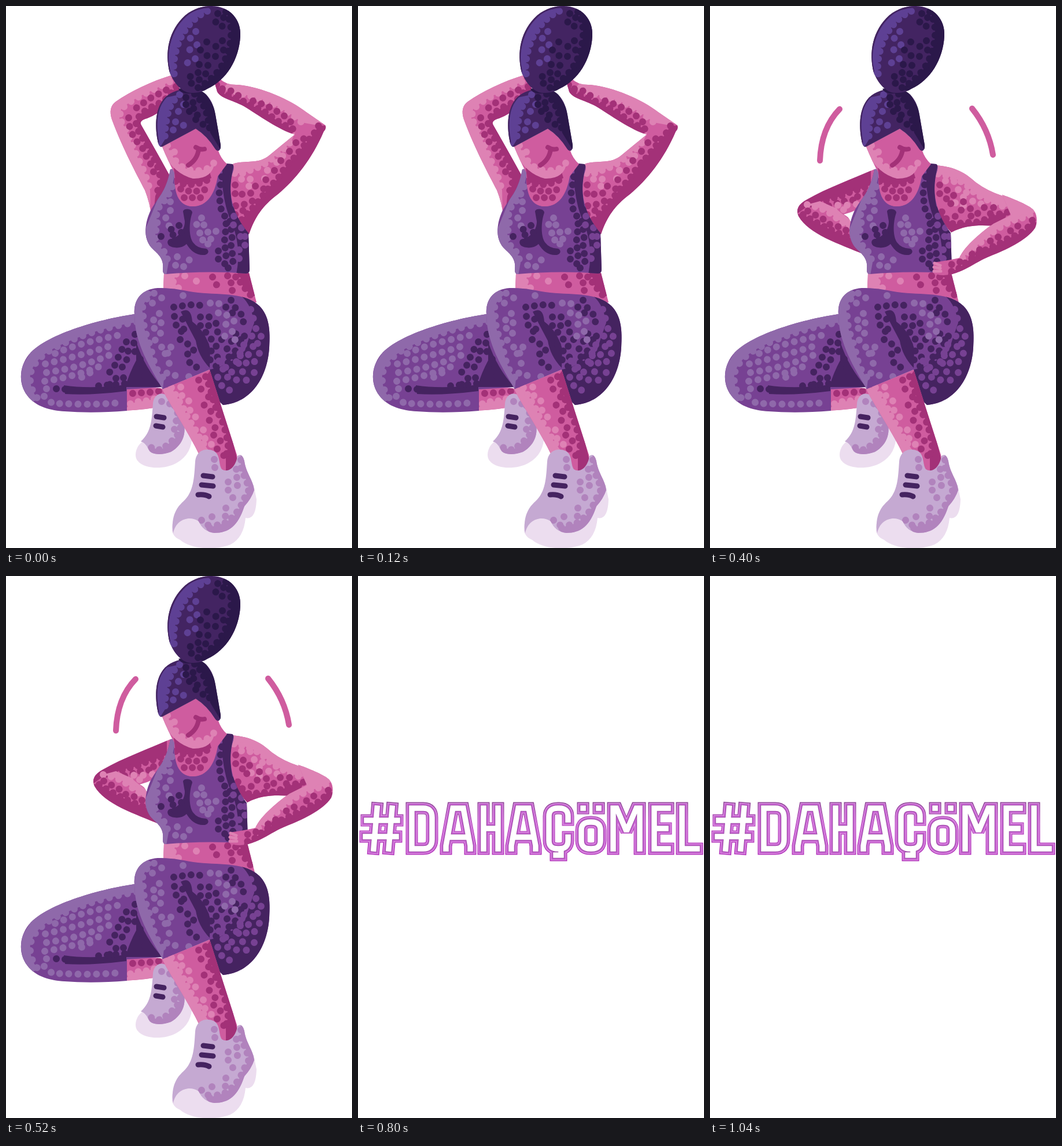
Animation of 598 by 936 pixels, one loop 1200 ms. Source, as an HTML page with a canvas:

```html
<!DOCTYPE html>
<html lang="tr">
<head>
<meta charset="utf-8">
<title>Squat</title>
<style>
html, body { margin: 0; width: 100%; height: 100%; overflow: hidden; background: #fff; }
canvas { display: block; width: 100%; height: 100%; }
</style>
</head>
<body>
<canvas width="598" height="936" role="img" aria-label="#DAHAÇÖMEL"></canvas>
<script>
const canvas = document.querySelector('canvas');
const g = canvas.getContext('2d');
const skin = { lit: '#de82b4', mid: '#cf5c9f', dim: '#a33178' };
const wear = { lit: '#8f69aa', mid: '#774193', dim: '#452360' };
const hair = { lit: '#5e4094', mid: '#432462', dim: '#2b184a' };
const shoe = { lit: '#ecddef', mid: '#c5a9d2', dim: '#b183bd' };

function fill(color, d) {
  g.fillStyle = color;
  g.fill(new Path2D(d));
}

function line(color, width, d) {
  g.strokeStyle = color;
  g.lineWidth = width;
  g.lineCap = g.lineJoin = 'round';
  g.stroke(new Path2D(d));
}

// Round beads strung along a path
function dots(color, d, gap = 15, size = 12) {
  g.setLineDash([0.01, gap]);
  line(color, size, d);
  g.setLineDash([]);
}

// A tone whose inner border is scalloped with beads
function tone(color, edge, rest, gap = 14) {
  fill(color, edge + rest + 'Z');
  dots(color, edge, gap);
}

function part(d, color, details) {
  g.save();
  fill(color, d);
  g.clip(new Path2D(d));
  details();
  g.restore();
}

function bun() {
  part('M355 0C387 0 407 24 405 52C403 92 381 128 348 143C338 150 325 150 318 150C303 148 290 133 283 115C274 80 281 42 310 16C325 4 340 0 355 0Z', hair.mid, () => {
    tone(hair.lit, 'M348 9C322 20 300 48 293 82Q288 102 291 119', 'L284 120C272 80 291 4 351 2', 13);
    dots(hair.lit, 'M328 44L315 60M330 67L311 80M327 91L308 101');
    tone(hair.dim, 'M380 10C395 36 390 70 376 98Q359 128 328 143', 'L360 152L420 90L400 0', 14);
    dots(hair.dim, 'M366 13L361 34M376 20L372 45M347 62L358 57M374 60L360 72M336 76L349 87L365 87M376 76V77M334 101L353 103L363 100M332 115L320 121L306 129M345 117L333 128L319 134');
    line(hair.mid, 4, 'M282 112C274 80 283 42 310 17Q326 2 355 1');
  });
}

function head() {
  part('M270 243L328 212C344 222 355 236 367 250Q371 263 382 273L366 294C361 325 347 347 322 346C298 345 290 315 291 288Q281 270 270 243Z', skin.mid, () => {
    tone(skin.dim, 'M293 303Q322 316 355 297', 'L350 280H290');
    dots(skin.dim, 'M302 316Q322 324 348 316M308 331H340', 14);
    fill(skin.mid, 'M268 242L328 210L366 250Q358 290 325 298Q290 290 268 242Z');
    tone(skin.lit, 'M279 241Q285 261 302 276Q326 291 352 279L361 269', 'Q357 299 323 298Q288 290 266 244', 15);
    dots(skin.lit, 'M291 252V266');
    line(skin.dim, 8, 'M315 275Q331 265 333 247M328 244Q336 249 343 247');
  });
  part('M318 143C344 142 358 162 362 188L371 240C372 251 365 253 361 246Q348 225 328 212L270 243Q264 245 262 232C257 205 258 176 275 158Q291 143 318 143Z', hair.mid, () => {
    tone(hair.lit, 'M300 153Q282 169 279 191Q274 212 275 230', 'L267 243H263Q255 180 276 158', 13);
    dots(hair.lit, 'M307 170L295 186M293 200L309 207M289 214V229');
    tone(hair.dim, 'M326 152Q343 168 349 194L353 219', 'L372 250L368 190L340 142', 13);
    dots(hair.dim, 'M311 158L325 168M311 170L332 181M317 182L341 193M328 196L343 206');
    line(hair.mid, 3, 'M263 235C256 195 261 167 284 151');
  });
  fill(hair.dim, 'M298 143Q318 138 338 146Q331 152 318 151Q303 153 298 143Z');
}

function torso(right) {
  fill(skin.mid, 'M288 287H372L362 330L322 352L294 335Z');
  part('M273 462Q345 456 ' + (right - 1) + ' 461L' + (right + 12) + ' 512H271Z', skin.mid, () => {
    tone(skin.lit, 'M294 463L289 476L299 488', 'H265V458');
    dots(skin.lit, 'M309 466L302 479M329 475L315 480');
    tone(skin.dim, 'M406 463L405 478L415 490L424 501', 'H440V450');
    dots(skin.dim, 'M357 468L363 480L371 492M383 466L376 479M389 478V491L402 492M397 468L399 480');
  });
  part(`M284 282Q292 280 292 288C289 319 297 346 322 346C350 346 360 319 366 290Q369 273 379 272L391 273Q396 276 391 290C383 325 392 360 ${right - 2} 392L${right} 455Q${right} 462 415 462C370 458 320 459 276 463Q271 463 271 456C274 436 262 428 254 420C238 405 238 380 249 355C262 330 276 324 284 282Z`, wear.mid, () => {
    tone(wear.lit, 'M287 312Q281 330 266 345Q256 361 263 379Q254 394 261 411L275 426L281 443', 'L277 465H264L235 400L284 280L293 285');
    dots(wear.lit, 'M284 338V353L276 366L282 380M296 433L293 448M307 450L318 437');
    dots(wear.lit, 'M338 366L329 378M342 378L355 375M335 392L363 389M340 404L367 401M349 411H350', 14);
    fill(wear.dim, 'M306 355C306 349 322 349 322 357C316 374 316 397 323 408Q331 419 346 419C353 423 349 430 342 430Q324 431 312 411C303 420 288 418 282 414C277 409 279 402 286 402C302 397 309 384 309 372Z');
    dots(wear.dim, 'M299 379L285 386M303 391L282 397M268 398V412M292 405H306');
    fill(wear.dim, 'M374 270H395Q384 310 391 345L425 390V468H397Q408 420 391 376Q378 350 374 310Z');
    dots(wear.dim, 'M373 295L368 326L372 352L381 368L379 394L377 411L381 426L378 446M387 372L391 397L389 414L393 440L382 455M367 423V449', 14);
    dots(wear.mid, 'M394 363L393 378M407 383L404 410M403 421V450M413 398V428', 15);
  });
}

function backShoe() {
  fill(shoe.lit, 'M245 748C226 753 219 776 228 786C240 800 274 801 295 789Q322 774 322 739L302 710Z');
  part('M254 687C255 669 272 663 283 678L304 709C314 733 308 757 285 770C264 778 248 773 246 765Q241 754 233 752C252 735 252 712 254 687Z', shoe.mid, () => {
    tone(shoe.dim, 'M291 690L297 704L294 716L302 730L294 745L281 756L268 767L249 762', 'L245 780H310L320 725L295 670');
    dots(shoe.dim, 'M269 683V684M283 687V702M291 731V732');
  });
  line(wear.dim, 9, 'M260 709L273 711M259 725L271 727');
}

function frontShoe() {
  fill(shoe.lit, 'M289 890C284 905 287 916 301 922C321 939 363 940 388 930Q411 918 414 884Q432 888 433 852L428 827L340 840Z');
  part('M327 787C329 765 349 763 360 769C371 776 367 791 373 800C386 808 398 793 400 777Q408 771 412 786C415 807 427 818 429 836Q424 851 412 864C401 898 385 910 360 910Q341 908 333 890C318 879 293 886 289 911C284 880 297 864 306 856C325 839 325 814 327 787Z', shoe.mid, () => {
    tone(shoe.dim, 'M406 784V800L415 818L420 835L412 850L405 865L394 881L378 893L362 897L350 902', 'L350 920H430L440 820L405 770');
    dots(shoe.dim, 'M360 783L361 797M398 800L399 815L400 829M384 822V838M392 849L398 860M380 867L379 883M356 882V883M338 888L350 897', 14);
  });
  line(wear.dim, 9, 'M341 811L357 813M338 827L358 829M332 844Q344 843 351 847');
}

function backLeg(shift) {
  part('M203 662Q242 656 273 661L278 690Q245 697 203 699Z', skin.mid, () => {
    tone(skin.lit, 'M215 687L229 683L243 682L258 678', 'L280 700H203');
    dots(skin.dim, 'M219 669L250 667L265 665');
  });
  backShoe();
  g.save();
  g.translate(shift, 0);
  part('M230 531C175 538 80 562 43 598C23 619 20 651 37 673C51 692 78 699 101 700Q150 704 209 699V662L275 658Z', wear.mid, () => {
    tone(wear.lit, 'M226 546Q149 558 87 589Q49 608 42 636Q40 661 55 678', 'L38 690L10 650L60 570L230 525', 16);
    dots(wear.lit, 'M85 600Q125 582 202 567M68 618Q120 606 184 586M70 633Q130 624 181 602M67 648Q120 640 165 621M131 641L148 632M70 661H71M66 674L82 688L97 686Q140 690 197 685', 16);
    fill(wear.dim, 'M225 580Q240 625 270 658H206Q214 632 225 612ZM100 655Q145 662 208 654V665Q145 673 102 670Z');
    dots(wear.dim, 'M223 567L221 582L224 607M208 580L198 597L186 625L171 641M211 596L208 614L196 630M190 643L178 655M87 661L104 662M160 656L208 652M203 642L212 630M232 610L240 640', 15);
  });
  g.restore();
}

function frontLeg() {
  part('M222 533C220 505 236 489 262 487C289 486 308 492 332 495C376 499 414 495 438 518C455 535 457 560 455 590C452 640 425 685 375 689L345 660L352 628L271 662C249 624 222 582 222 533Z', wear.mid, () => {
    tone(wear.lit, 'M256 496L242 507L235 523L238 540L239 557L245 574L251 593L255 611L262 629L273 644', 'L270 670L215 560L222 480', 16);
    dots(wear.lit, 'M269 504L283 504M306 500V501M253 513V527M265 531L251 547M268 547L252 560M267 565L257 578M269 589L284 604M285 589L270 606M282 617L269 620M278 634L300 640M316 640V641');
    fill(wear.dim, 'M302 528Q320 518 322 545Q345 562 353 592L352 625Q332 604 328 578Q314 552 302 528ZM401 497Q423 510 429 547Q420 571 413 595Q388 620 352 628L372 700L470 650V510Z');
    dots(wear.dim, 'M290 520L318 516L338 517M291 536L306 541M294 551L311 560M301 576L318 586L332 605M314 601L318 618L332 625M303 562L314 570M336 537V553L351 570L365 590M335 573L349 590L366 607M363 548L366 565L378 585M351 537L350 554M389 508L398 524L411 537L409 557M380 520L397 535M412 570L396 596L381 610M394 605L375 626M363 622L350 608M382 592L398 565L410 582', 15);
    dots(wear.mid, 'M423 524L428 541L441 544M432 557L442 572M425 570L438 587M427 588L440 602M419 602L432 617M405 604L418 620M402 617L412 638L417 650M390 632L401 650M375 627L387 648M366 641L374 658L390 665M368 613L382 626M411 585L396 619M429 633V634', 16);
    dots(wear.lit, 'M353 513L368 514M367 530L382 534M394 544L379 550M391 562L397 580M378 570V571');
  });
  part('M270 662L352 628Q376 704 399 775C403 792 390 804 376 803L335 777C315 735 290 700 270 662Z', skin.mid, () => {
    tone(skin.lit, 'M286 659L296 676L307 695L315 713L326 729L337 750L350 767', 'L333 786L260 660');
    dots(skin.lit, 'M302 658L304 673L320 685M318 698L331 714M341 732L344 747L356 758');
    tone(skin.dim, 'M345 640L353 661L358 680L364 698L373 715L380 737L384 758L380 780', 'V805H405L360 620');
    dots(skin.dim, 'M333 646L337 661L339 675M350 675L342 690M354 700L351 715L362 729M359 741L371 750L364 764L377 777', 16);
  });
  frontShoe();
}

const noop = () => {};
const poses = [
  {
    right: 421, shift: 0, marks: '', front: noop,
    back() {
      part('M288 119C251 130 216 147 190 165Q176 175 183 196C202 247 225 289 240 318Q249 341 251 362L292 310Q273 274 234 206Q229 198 244 194Q280 180 302 145Z', skin.mid, () => {
        tone(skin.lit, 'M283 131L266 139L248 148L231 156L214 166L199 178L196 194L206 211L213 227L220 244L227 261L235 277L242 295L249 318', 'L250 365L165 190L180 150L295 110', 15);
        tone(skin.dim, 'M294 139L278 159L263 169L248 176L233 186L224 200L230 219L239 233L248 249L257 267L265 284L267 308L258 328', 'L255 360L300 310L240 200L310 150', 14);
        dots(skin.dim, 'M277 145L248 160L224 177M212 193L214 212L222 229L237 247L244 263L255 281V296');
      });
      part('M358 123Q363 119 370 126Q381 137 401 136C442 140 490 161 520 184L552 206Q554 212 549 217C529 264 500 300 470 325C443 345 430 365 420 394C387 370 380 320 387 280Q389 272 398 271C423 267 437 272 455 258Q478 239 499 222C472 214 437 189 411 173C388 161 372 160 365 148Z', skin.mid, () => {
        tone(skin.lit, 'M384 141L402 150L420 155L439 160L458 167L476 177L494 188L511 201', 'L543 207L552 190L470 130L380 125');
        tone(skin.dim, 'M364 136L376 151L395 158L414 166L433 176L450 184L467 197L484 207L500 214', 'L490 225L350 170V130');
        dots(skin.dim, 'M374 143L390 147L408 159M427 164L450 172L465 180L480 189L493 201');
        tone(skin.lit, 'M395 289L409 289L424 283L440 277L454 269L467 257L481 246L493 234', 'L500 218L390 260');
        dots(skin.lit, 'M407 299L432 299M420 311L406 314M447 298L452 283M468 270L481 256');
        tone(skin.dim, 'M540 207L531 222L519 236L506 252L494 267L480 282L469 299L454 314L442 330L429 346L414 361L403 374', 'L420 405L500 320L570 205');
        dots(skin.dim, 'M501 236L515 229M490 251L502 249M475 267L490 271M464 284L476 289M449 300L459 310M431 311L446 316M408 325L425 323M397 345L414 342L430 335M396 360L410 353M396 309V328');
      });
    }
  },
  {
    right: 419, shift: 1,
    marks: 'M238 163Q211 186 209 224M438 163Q459 187 466 219',
    back() {
      part('M276 264C240 254 188 253 161 264Q145 270 146 292C148 317 209 330 268 339L286 309L275 281L280 276Z', skin.mid, () => {
        tone(skin.lit, 'M154 286L169 279L185 277L202 276L219 274L237 274L255 273L269 270', 'V245H140V290');
        tone(skin.lit, 'M157 311L175 315L194 314L213 316L231 317L247 320L258 330', 'L270 345H150V310');
        tone(skin.dim, 'M154 297L169 298L184 295L200 294L217 292L234 291L251 289L268 286', 'L279 299L221 303Q188 311 154 308');
        dots(skin.dim, 'M167 285L185 286L211 283L238 282L264 281M238 302L260 299L274 304M268 319V333');
      });
      part('M386 288L418 270L500 270L577 293Q545 313 532 322C490 342 434 361 420 394C388 370 382 323 386 288Z', skin.mid, () => {
        tone(skin.lit, 'M392 298L407 298L422 301', 'V285H385');
        tone(skin.dim, 'M534 309L514 321L498 333L478 342L460 349L440 355L423 366L410 380', 'L420 400L560 320');
        dots(skin.dim, 'M400 321L421 324L441 312M397 337L414 338L428 334L446 323M461 311L473 322L492 314M399 354L416 350L436 341L457 335M486 326L505 319');
      });
    },
    front() {
      line(skin.mid, 5, 'M268 263L280 261M268 271L280 269M269 279L282 277');
      part('M374 252Q381 262 390 266C428 260 482 252 528 260C561 264 583 272 586 281Q582 291 561 299C526 310 459 307 411 293L371 291Q363 282 365 268L377 264Z', skin.mid, () => {
        tone(skin.lit, 'M395 270L413 273L431 276L449 277L468 278L487 279L506 281L525 280L543 279L559 278', 'L575 274V245H390');
        tone(skin.dim, 'M371 282L388 283L405 288L423 290L441 292L460 294L479 294L498 295L516 294L534 291L552 288L570 281', 'H590V315H410L370 295');
        dots(skin.dim, 'M389 272L407 281L427 284L452 286L474 288L493 289L514 289L539 286L558 289');
      });
      line(skin.mid, 4, 'M368 257L386 266M363 265L385 272');
    }
  },
  {
    right: 418, shift: 0,
    marks: 'M224 178Q192 211 190 267M453 177Q482 213 489 257',
    back() {
      part('M284 282C247 298 201 315 168 334Q145 346 153 363C171 394 221 410 269 430L261 397L242 371Q240 364 231 360Q258 353 284 334Z', skin.mid, () => {
        tone(skin.dim, 'M174 342L191 338L207 333L225 329L243 321L260 316L278 309', 'V270L150 330V359');
        dots(skin.dim, 'M205 345L222 340M232 337L248 335M255 329L273 323');
        tone(skin.lit, 'M168 343L184 347L200 353L213 362L225 371L236 380L247 393', 'L243 370L230 360L215 348L190 337');
        dots(skin.lit, 'M221 344L237 344L257 342M215 354L243 350', 16);
        tone(skin.dim, 'M161 360L177 370L192 378L208 386L224 393L241 400L258 405', 'L270 435L150 390V359');
        dots(skin.dim, 'M169 354L184 362L201 371M207 377L225 382L240 390');
      });
      part('M391 275C424 278 441 288 460 305Q479 319 503 327L553 350L510 380C483 381 451 373 417 391C387 359 381 317 391 275Z', skin.mid, () => {
        tone(skin.lit, 'M394 290L412 294L430 301L445 311L458 324L475 333L491 341L509 347', 'L550 342L470 295L390 260');
        dots(skin.lit, 'M407 302L432 304M429 317L446 323M454 337L470 342M424 340V354M438 330V348');
        tone(skin.dim, 'M514 356L496 360L478 368L461 373L440 374L421 377L407 366L397 349', 'V400L500 395');
        dots(skin.dim, 'M397 309V326M410 318L408 340M421 327L414 348M438 338L434 353L422 365M450 350L464 359L443 365M474 348L486 360M490 348L501 355');
      });
    },
    front() {
      part('M505 326C530 335 550 344 558 351C565 358 567 371 562 383C548 405 509 422 484 432C456 443 435 464 403 465Q389 465 386 458L386 443Q414 439 431 435C440 414 472 388 490 376L520 361Z', skin.mid, () => {
        tone(skin.lit, 'M553 361L537 367L522 371L505 380L491 389L476 402L461 414L447 425L435 437', 'L424 430L500 320L570 350');
        tone(skin.dim, 'M557 370L547 386L531 395L514 402L497 412L480 419L461 430L444 441L429 454L412 460', 'L410 475L500 445L575 380');
        dots(skin.dim, 'M532 380L515 391M498 399L482 407M466 421L449 431M432 442L405 450');
      });
      line(skin.lit, 5, 'M388 444L398 448M387 451L398 453M387 458L399 458');
    }
  },
  {
    right: 412, shift: -3,
    marks: 'M199 224Q188 256 193 293M477 210Q496 238 501 279M471 550L483 549M474 568L487 571M471 589L481 597',
    back() {
      part('M284 282C248 326 196 350 168 379C149 398 143 413 145 429Q156 463 190 496L223 527L242 500Q229 468 201 426C217 405 240 395 251 391L278 329Z', skin.mid, () => {
        tone(skin.lit, 'M264 313L250 329L236 343L221 355L207 367L193 379L182 391L170 407L167 424L176 443L188 460L198 477L211 491L222 505', 'L221 540L125 440L150 370L280 280', 15);
        tone(skin.dim, 'M275 315L258 348L247 364L232 374L217 383L204 394L192 409L188 425L199 443L206 460L217 476L227 491L234 506', 'L250 500L201 425L255 390L290 320');
        dots(skin.dim, 'M249 354L231 365L218 373L203 387L188 401L177 422L183 436L192 453L201 465');
      });
      part('M391 275C426 282 441 296 460 310C493 323 532 353 555 374L584 402Q587 407 577 420L525 410C500 398 476 385 457 384C438 384 430 392 413 393C386 358 382 317 391 275Z', skin.mid, () => {
        fill(skin.dim, 'M390 270H420L600 400L570 400L500 360L425 321L390 324Z');
        dots(skin.dim, 'M397 309L411 326L426 341M424 319L445 335L465 347M453 327L478 347L495 363M485 353L508 373L525 385M518 368L547 387L561 401M396 338H410M442 349L455 354');
        dots(skin.mid, 'M404 283L401 298M421 297L436 310M409 309L428 323M449 315L472 326M458 330L486 341M488 338L518 358M502 357L533 374M529 365L561 391');
        tone(skin.lit, 'M395 350L410 352L427 359L444 362L461 366L478 374L494 384L510 394L525 402', 'L530 425L400 405');
      });
    },
    front() {
      part('M522 404L545 404L584 405L578 420C562 455 528 481 500 500Q469 516 446 531L438 552L420 551L412 535L427 511C460 486 493 451 522 417Z', skin.mid, () => {
        tone(skin.dim, 'M572 406L554 417L540 429L525 441L510 452L495 464L480 476L465 488L449 501L435 516', 'L420 520L520 400L550 385');
        dots(skin.dim, 'M548 434L533 447M518 459L503 470M488 483L473 494M459 506L445 516M434 529H435');
        tone(skin.lit, 'M571 424L559 439L545 454L529 466L513 477L497 489L481 499L464 509', 'L455 535L560 500L590 410');
      });
      line(skin.mid, 7, 'M422 529L414 535M426 534L420 549M433 535L429 554M440 532L437 556');
    }
  }
];

function drawPose(pose) {
  pose.back();
  torso(pose.right);
  backLeg(pose.shift);
  frontLeg();
  head();
  bun();
  pose.front();
  line(skin.mid, 10, pose.marks);
}

const A = 'M0 70V65L12 0H30L42 65V70M8 50H34';
const letters = [
  [13, 'M20 0L14 70M46 0L40 70M2 21H55M0 49H53'],
  [93, 'M0 0H20Q35 0 35 16V54Q35 70 20 70H0Z'],
  [152, A],
  [217, 'M0 0V70M25 0V70M0 35H25'],
  [265, A],
  [330, 'M33 20V14Q33 0 18 0H15Q0 0 0 14V56Q0 70 15 70H18Q33 70 33 56V50M21 70V81H12'],
  [386, 'M3 0h.1M30 0h.1M15 24H18Q33 24 33 38V56Q33 70 18 70H15Q0 70 0 56V38Q0 24 15 24Z'],
  [441, 'M0 70V0H6L23 40L40 0H46V70'],
  [512, 'M24 0H0V70H24M0 35H20'],
  [560, 'M0 0V70H26']
];

function drawWord() {
  const sheen = g.createLinearGradient(0, -12, 0, 84);
  sheen.addColorStop(0, '#8d4596');
  sheen.addColorStop(0.4, '#bd51c6');
  sheen.addColorStop(1, '#b233bb');
  const coats = [[21, sheen], [17.5, '#eeb4f2'], [16, '#c662d0'], [11.5, '#9c4aa6'], [9.5, '#fff']];
  g.lineCap = 'square';
  g.lineJoin = 'miter';
  g.miterLimit = 2;
  for (const [x, d] of letters) {
    const path = new Path2D(d);
    g.save();
    g.translate(x, 401);
    for (const [width, color] of coats) {
      g.lineWidth = width;
      g.strokeStyle = color;
      g.stroke(path);
    }
    g.restore();
  }
}

const LOOP = 1200, STEP = 200;
let shown = -1;

function tick(now) {
  const step = Math.min(4, Math.floor(now % LOOP / STEP));
  if (step === shown) return;
  shown = step;
  g.fillStyle = '#fff';
  g.fillRect(0, 0, 598, 936);
  if (step < 4) drawPose(poses[step]);
  else drawWord();
}

const start = performance.now();
function loop() {
  tick(performance.now() - start);
  requestAnimationFrame(loop);
}
loop();
</script>
</body>
</html>
```
